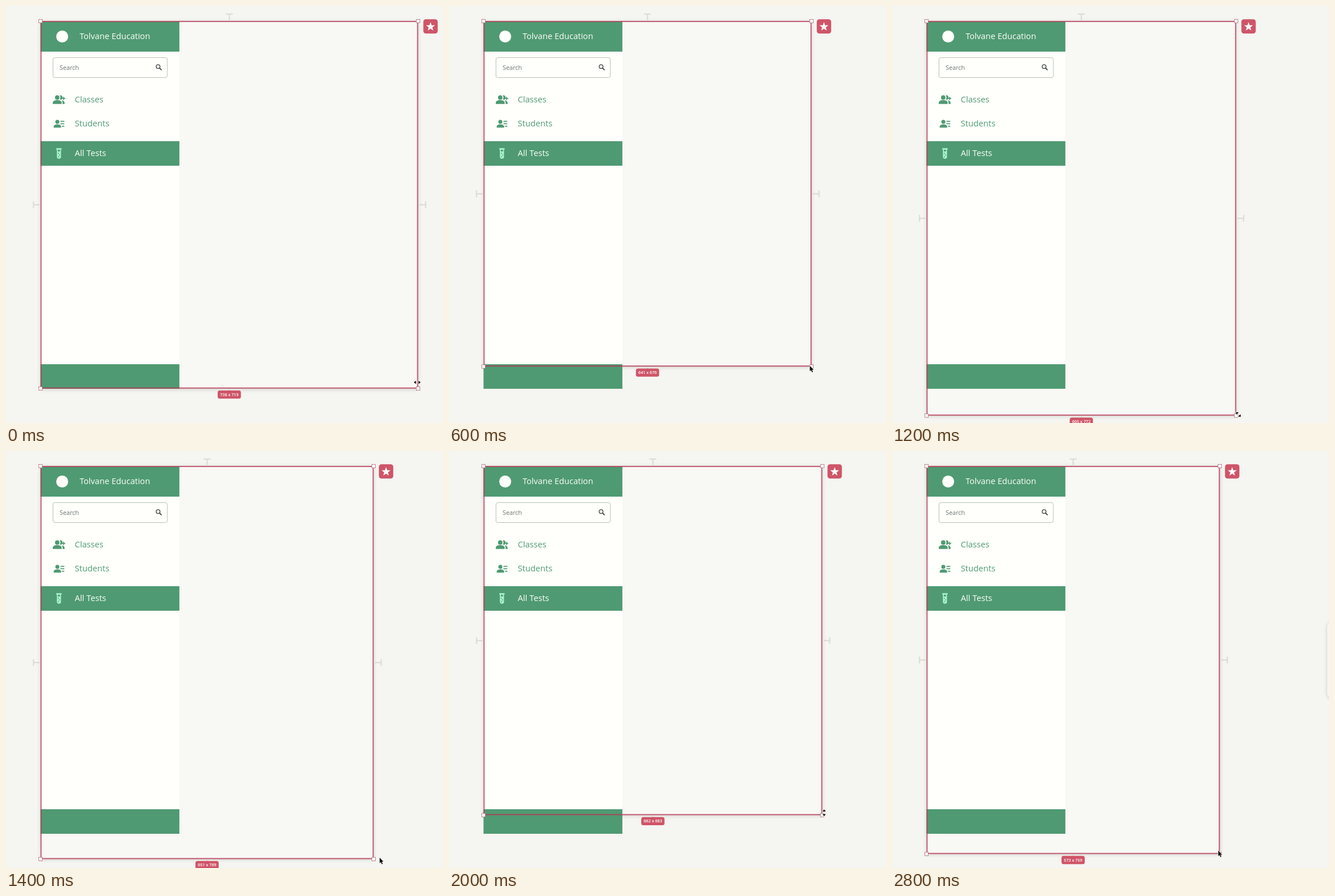
Animation, 766 px wide and 731 px high, one loop 2.9 s. Source, as an HTML page with a canvas:

```html
<!DOCTYPE html>
<html lang="en">
<head>
<meta charset="utf-8">
<title>Resizing a frame</title>
<style>
html, body { margin: 0; width: 100%; height: 100%; overflow: hidden; background: #f5f5f1; }
canvas { display: block; width: 766px; height: 731px; }
</style>
</head>
<body>
<canvas id="stage"></canvas>
<script>
const W = 766, H = 731, LOOP = 2900;
const canvas = document.getElementById('stage');
const ctx = canvas.getContext('2d');
const dpr = window.devicePixelRatio || 1;
canvas.width = W * dpr;
canvas.height = H * dpr;

const FONT = '"Open Sans", "Noto Sans", sans-serif';
const BG = '#f5f5f1', PANEL = '#f8f8f5', PAPER = '#fffffb';
const GREEN = '#4f9a72', MINT = '#a9f3cc', RED = '#cf5568', MARK = '#dcdcd8';
const LEFT = 60.5, TOP = 26.5, ZOOM = 0.8957, SIDE = 303.9;

// time, frame width, frame height, pointer offset from the corner, pointer kind
const KEYS = [
  [0, 738, 719, -1.5, -10.7, 'ew'],
  [200, 718, 718, -1, -8, 'ew'],
  [600, 641, 676, -3, -1.5, 'arrow'],
  [800, 630, 720, -2, -1, 'arrow'],
  [1000, 590, 730, 0, 0, 'nwse'],
  [1200, 605, 772, 4, -2, 'nwse'],
  [1400, 651, 769, 10.5, -2.5, 'arrow'],
  [1600, 684, 751, 7, -3, 'arrow'],
  [2000, 662, 683, 3.3, -4, 'ns'],
  [2400, 569, 706, -3.5, 3, 'arrow'],
  [2600, 562, 728, -3, -2, 'arrow'],
  [2800, 573, 759, -2.7, -6, 'arrow']
];

// The picture advances every 100 ms and rests for one step at these times.
const RESTS = [300, 900, 1300, 1700, 2100, 2500];

function poseAt(time) {
  let t = Math.floor(time / 100) * 100;
  if (RESTS.includes(t)) t -= 100;
  let i = KEYS.length - 1;
  while (KEYS[i][0] > t) i--;
  const a = KEYS[i], b = KEYS[i + 1] || a;
  const k = b === a ? 0 : (t - a[0]) / (b[0] - a[0]);
  const mix = n => a[n] + (b[n] - a[n]) * k;
  return { w: Math.round(mix(1)), h: Math.round(mix(2)), dx: mix(3), dy: mix(4), kind: a[5] };
}

function rect(x, y, w, h, color) {
  ctx.fillStyle = color;
  ctx.fillRect(x, y, w, h);
}

function rounded(x, y, w, h, r) {
  ctx.beginPath();
  ctx.roundRect(x, y, w, h, r);
}

function fillRounded(x, y, w, h, r, color) {
  rounded(x, y, w, h, r);
  ctx.fillStyle = color;
  ctx.fill();
}

function disc(x, y, r, color) {
  ctx.beginPath();
  ctx.arc(x, y, r, 0, Math.PI * 2);
  ctx.fillStyle = color;
  ctx.fill();
}

function shape(d, color) {
  ctx.fillStyle = color;
  ctx.fill(new Path2D(d));
}

function line(x1, y1, x2, y2, width, color) {
  ctx.beginPath();
  ctx.moveTo(x1, y1);
  ctx.lineTo(x2, y2);
  ctx.lineWidth = width;
  ctx.strokeStyle = color;
  ctx.stroke();
}

function text(str, x, y, size, color, weight = 500) {
  ctx.font = `${weight} ${size}px ${FONT}`;
  ctx.fillStyle = color;
  ctx.fillText(str, x, y);
}

function shadowed(blur, dy, color, draw) {
  ctx.save();
  ctx.shadowColor = color;
  ctx.shadowBlur = blur * dpr;
  ctx.shadowOffsetY = dy * dpr;
  draw();
  ctx.restore();
}

function drawSearch() {
  rounded(82.3, 90.5, 200.5, 35, 3.5);
  ctx.lineWidth = 1;
  ctx.strokeStyle = '#b9beb8';
  ctx.stroke();
  text('Search', 94, 111.5, 10.75, '#6d7674');
  ctx.beginPath();
  ctx.arc(266.6, 106.2, 3.3, 0, Math.PI * 2);
  ctx.lineWidth = 1.4;
  ctx.strokeStyle = '#3f4744';
  ctx.stroke();
  line(268.9, 108.5, 272.7, 112.4, 1.8, '#3f4744');
}

function drawClassesIcon() {
  disc(89.8, 160.4, 3.9, GREEN);
  shape('M82 171.7v-2.2c0-3 4-4.4 7.8-4.4s7.8 1.4 7.8 4.4v2.2z', GREEN);
  shape('M94.2 156.7c2.6-1 5 1 5 3.7s-2.400 4.700-5 3.700c1.700-2.200 1.700-5.200 0-7.400z', GREEN);
  shape('M97.300 165.300c2.900.500 5.400 1.900 5.400 4.200v2.200h-3.500v-2.200c0-1.700-.700-3.100-1.900-4.200z', GREEN);
  line(98.2, 162, 103.8, 162, 1.7, GREEN);
  line(101, 159.200, 101, 164.800, 1.7, GREEN);
}

function drawStudentsIcon() {
  disc(90, 203.100, 3.5, GREEN);
  shape('M83.600 213.200v-1.700c0-2.600 3.300-4 6.500-4s6.500 1.400 6.500 4v1.700z', GREEN);
  line(95.5, 202.200, 102.200, 202.200, 1.7, GREEN);
  line(95.5, 206.400, 102.200, 206.400, 1.7, GREEN);
  line(98, 210.700, 102.200, 210.700, 1.7, GREEN);
}

function drawTubeIcon() {
  fillRounded(88, 249.300, 9.600, 2.300, 0.6, MINT);
  fillRounded(89.200, 250, 7.200, 17.800, [0, 0, 3.6, 3.6], MINT);
  rect(91, 252, 3.600, 3, GREEN);
  disc(91.800, 258.200, 0.9, GREEN);
  disc(93.800, 261, 0.9, GREEN);
  disc(92.200, 264.200, 0.9, GREEN);
}

function drawSidebar() {
  rect(LEFT, 27, SIDE - LEFT, 53, GREEN);
  disc(98.5, 53.5, 10.5, PAPER);
  text('Tolvane Education', 129, 57.700, 14.600, PAPER);
  drawSearch();
  drawClassesIcon();
  text('Classes', 120.500, 168.800, 14.600, GREEN);
  drawStudentsIcon();
  text('Students', 120.500, 211.300, 14.700, GREEN);
  rect(LEFT, 237, SIDE - LEFT, 43, GREEN);
  drawTubeIcon();
  text('All Tests', 120.500, 263.300, 14.700, PAPER);
  rect(LEFT, 628, SIDE - LEFT, 43, GREEN);
}

function drawMarks(right, bottom, midX, midY) {
  line(48.2, midY - 6, 48.2, midY + 6, 2.2, MARK);
  line(48.2, midY, 58.5, midY, 2.2, MARK);
  line(right + 13.2, midY - 6, right + 13.2, midY + 6, 2.2, MARK);
  line(right + 2.5, midY, right + 13.2, midY, 2.2, MARK);
  line(midX - 6, 14.2, midX + 6, 14.2, 2.2, MARK);
  line(midX, 14.2, midX, 24.5, 2.2, MARK);
  line(midX, bottom + 2, midX, bottom + 10, 2.2, MARK);
}

function drawBadge(right) {
  fillRounded(right + 9.2, 23.3, 25.2, 25, 4.5, RED);
  const cx = right + 21.8, cy = 36.4;
  ctx.beginPath();
  for (let i = 0; i < 10; i++) {
    const a = -Math.PI / 2 + i * Math.PI / 5, r = i % 2 ? 3.4 : 8.2;
    ctx.lineTo(cx + r * Math.cos(a), cy + r * Math.sin(a));
  }
  ctx.closePath();
  ctx.fillStyle = '#fff';
  ctx.fill();
}

function drawSize(pose, midX, bottom) {
  const label = `${pose.w} x ${pose.h}`;
  ctx.font = `600 7.2px ${FONT}`;
  const w = ctx.measureText(label).width;
  fillRounded(midX - w / 2 - 4.2, bottom + 3.4, w + 8.4, 14.4, 3.5, RED);
  text(label, midX - w / 2, bottom + 13.2, 7.2, '#fff', 600);
}

function drawHandle(x, y) {
  rect(x - 3.5, y - 3.5, 7, 7, '#b06a76');
  rect(x - 2.7, y - 2.7, 5.4, 5.4, '#fff');
}

function drawPointer(x, y, kind) {
  const turn = { ew: 0, nwse: Math.PI / 4, ns: Math.PI / 2 };
  const path = new Path2D(kind === 'arrow'
    ? 'M0 0V9.800L2.200 7.900L3.900 11.700L5.500 11L3.900 7.300H6.800Z'
    : 'M-6 0L-2.200 -3V3ZM6 0L2.200 -3V3Z');
  ctx.save();
  ctx.translate(x, y);
  ctx.rotate(turn[kind] || 0);
  ctx.lineWidth = 1.4;
  ctx.lineJoin = 'round';
  ctx.strokeStyle = '#fff';
  ctx.stroke(path);
  ctx.fillStyle = '#111';
  ctx.fill(path);
  ctx.restore();
}

function draw(time) {
  const pose = poseAt(time);
  const right = 61.3 + pose.w * ZOOM, bottom = TOP + pose.h * ZOOM;
  const midX = (LEFT + right) / 2, midY = (TOP + bottom) / 2;

  ctx.setTransform(dpr, 0, 0, dpr, 0, 0);
  rect(0, 0, W, H, BG);

  // neighbouring panel, pushed along by the frame
  shadowed(6, 1, 'rgba(60,60,80,.22)', () =>
    fillRounded(right + 188.3, midY - 67, 200, 134, 9, '#f6f6f3'));

  drawMarks(right, bottom, midX, midY);
  shadowed(7, 1, 'rgba(0,0,0,.2)', () =>
    rect(LEFT, TOP, right - LEFT, bottom - TOP, PANEL));
  rect(LEFT, TOP, SIDE - LEFT, Math.min(bottom, 671) - TOP, PAPER);
  drawSidebar();

  ctx.lineWidth = 1.9;
  ctx.strokeStyle = 'rgba(182,56,84,.85)';
  ctx.strokeRect(61.4, 27.1, right - 62.2, bottom - 27.9);
  for (const x of [LEFT, right]) for (const y of [TOP, bottom]) drawHandle(x, y);

  drawBadge(right);
  drawSize(pose, midX, bottom);
  drawPointer(right + pose.dx, bottom + pose.dy, pose.kind);
}

const start = performance.now();
function tick() {
  draw((performance.now() - start) % LOOP);
  requestAnimationFrame(tick);
}
tick();
</script>
</body>
</html>
```
